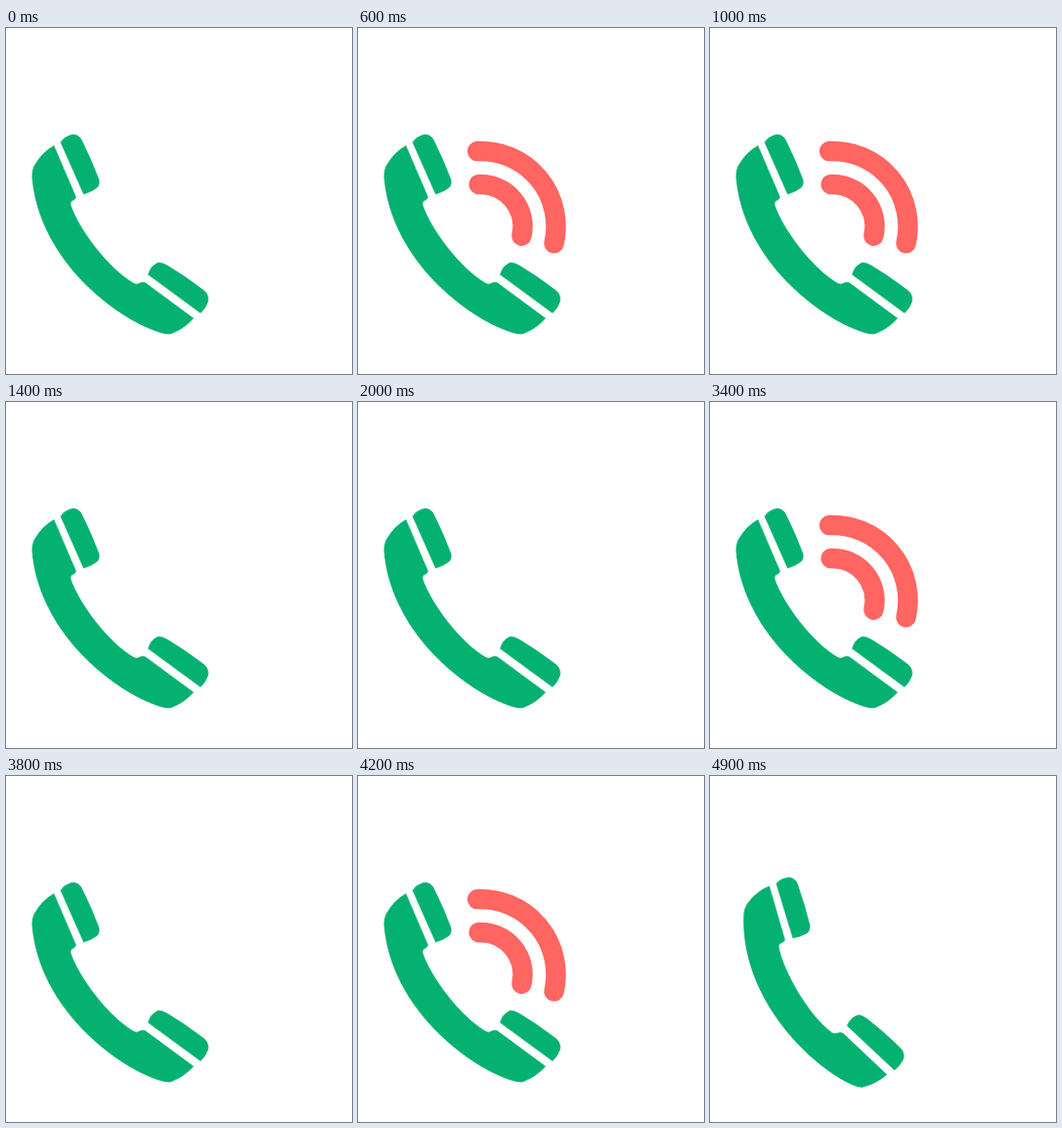
Recreate the animation shown at these times as an HTML page. Size 354 by 354 pixels, loop 5000 ms.

```html
<!DOCTYPE html>
<html lang="en">
<head>
<meta charset="utf-8">
<title>Ringing phone</title>
<style>
  html, body { margin: 0; width: 100%; height: 100%; overflow: hidden; background: #fff; }
  svg { display: block; width: 100vw; height: 100vh; }
  #phone { fill: #04b171; stroke: #04b171; stroke-width: 0.6; stroke-linejoin: round; }
  #waves { fill: none; stroke: #ff6561; stroke-width: 20.5; stroke-linecap: round; }
</style>
</head>
<body>
<svg viewBox="0 0 354 354">
  <g id="phone">
    <path d="M49 120.500 L71.5 173 Q71 175.500 68 176.500 Q65.500 178 66 181
             C74 205 104 246 131 261.500 Q134 263 137 261 Q140 259.500 142.500 260.800
             L191.700 297 Q182 308 168 313 Q163 313 158 311.500
             C112 297 33.500 237 26.800 152 Q26.500 146 29 141 Q37 127 49 120.500 Z"/>
    <path d="M56 117 Q59 111.500 68 109 Q74 109 77 114
             Q87 134 95 155 Q96 160 93.500 163 Q87 168 79.500 170 Z"/>
    <path d="M145.500 252.300 Q148 243 156 240 Q160 240 165 243
             Q183.500 254 203 269 Q208 274 206.500 280 Q204 287 199 291.500 Z"/>
  </g>
  <g id="waves"></g>
</svg>
<script>
  const STEP = 100, LOOP = 5000, CYCLE = 12;
  const SWING = [0, 7, 0, -7];
  const phone = document.getElementById('phone');
  const group = document.getElementById('waves');
  const center = [125.5, 203];

  const polar = (r, deg) => {
    const a = deg * Math.PI / 180;
    return [center[0] + r * Math.cos(a), center[1] + r * Math.sin(a)].map(v => v.toFixed(2)).join(' ');
  };

  const waves = [43, 77, 111].map(r => {
    const arc = document.createElementNS('http://www.w3.org/2000/svg', 'path');
    arc.setAttribute('d', `M${polar(r, -92.5)} A${r} ${r} 0 0 1 ${polar(r, 13)}`);
    group.appendChild(arc);
    return arc;
  });

  // Four beats of shaking, then two rounds of waves building up.
  function draw(t) {
    const beat = Math.floor((t % LOOP) / STEP) % CYCLE;
    const shaking = beat < 4;
    const angle = shaking ? SWING[beat] : 0;
    const count = shaking ? 0 : beat % 4;
    phone.setAttribute('transform', `rotate(${angle} 117.5 211.5)`);
    waves.forEach((arc, i) => arc.setAttribute('visibility', i < count ? 'visible' : 'hidden'));
  }

  let start;
  function tick(now) {
    start ??= now;
    draw(now - start);
    requestAnimationFrame(tick);
  }
  draw(0);
  requestAnimationFrame(tick);
</script>
</body>
</html>
```
